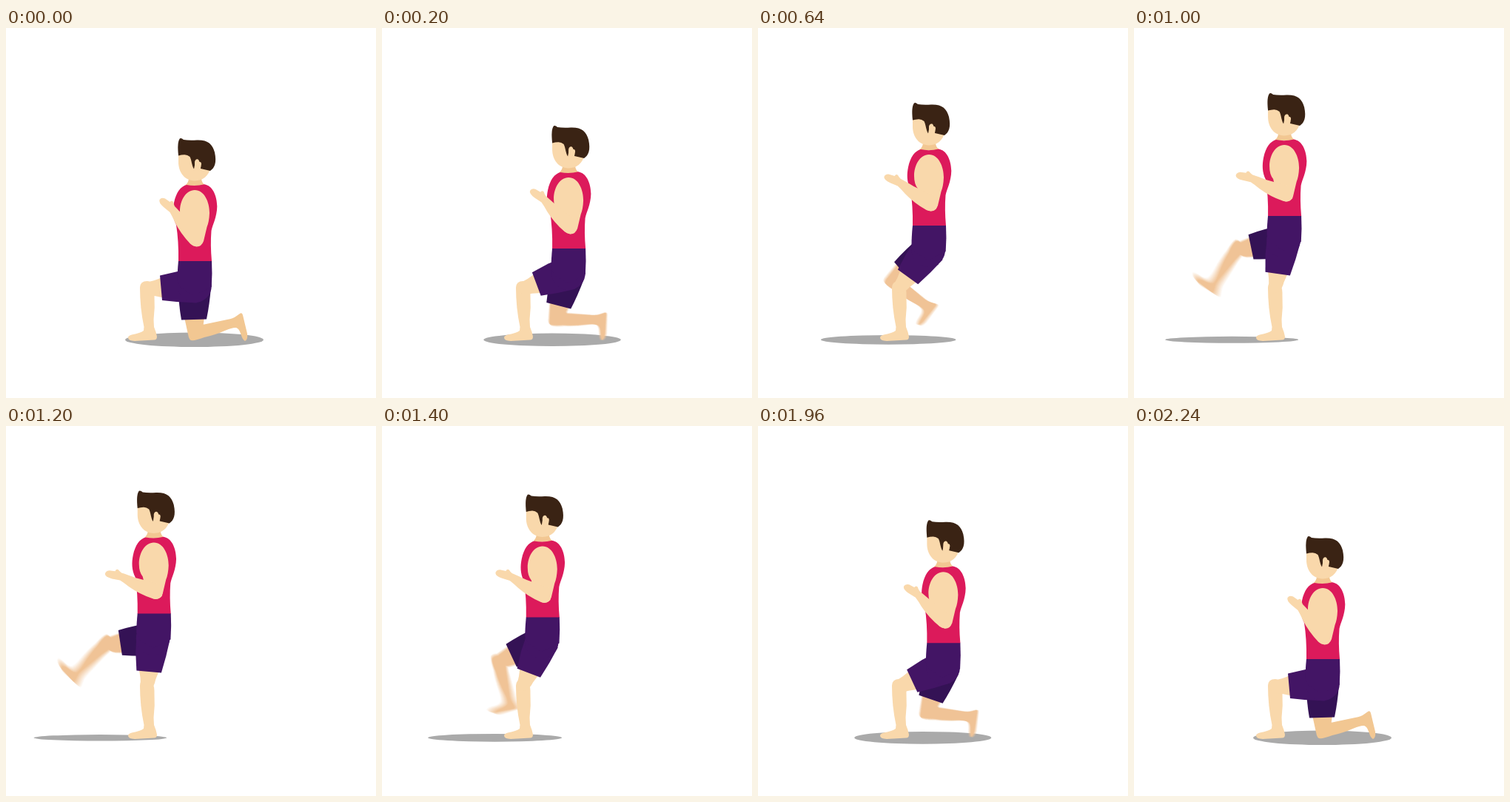
Animation of 500x500 px, one loop 2400 ms. Source, as an HTML page with a canvas:

```html
<!DOCTYPE html>
<html lang="en">
<head>
<meta charset="utf-8">
<title>Lunge exercise</title>
<style>
html, body { margin: 0; width: 100%; height: 100%; overflow: hidden; background: #fff; }
canvas { display: block; }
</style>
</head>
<body>
<canvas id="stage" width="500" height="500"></canvas>
<script>
const LOOP = 2400, STEP = 40, HALF = 1120;
const SKIN = '#f9d8ab', SHADE = '#f2c792', PURPLE = '#431565', DARK = '#341255';
const PINK = '#dc1a5b', HAIR = '#3a2314', GROUND = '#aaaaaa';

const knee = { x: 189.8, y: 351.4 };
const hip = { x: 254.2, y: 349.1 };
const rearKnee = { x: 254, y: 410 };
const elbow = { x: 258, y: 284 };

// All shapes are drawn in the kneeling pose.
const shape = {
  shin: new Path2D('M181 351 Q181 342 191 342 Q201 343 200.5 362 Q201.5 378 199.5 394 L200 404 Q203 411 204 417 Q204 421.500 200 421.500 L174 423 Q165 422.500 165 418.500 Q165 415.500 171 414.300 Q181 412.500 186 409 L186.500 404 Q181 378 181 351Z'),
  thighSkin: new Path2D('M181.500 350 Q183 343.500 190 343 Q199 342.500 212 336.500 L213 364.500 L200.500 362 Q192 362 186 358Z'),
  thigh: new Path2D('M208 334.500 L232 329 L248 327 L262 346 L258 371.500 Q234 371 211 368Z'),
  pelvis: new Path2D('M233 314.500 L278 314.500 Q279 331 277.700 350 L254 362 L236 351 L231.500 341 Q231.500 330 233 314.500Z'),
  rearShorts: new Path2D('M232.500 345 Q233 372 237 394.500 L271 393.500 Q275 374 277 350 L254 340Z'),
  rearThigh: new Path2D('M241 391 L268 391 L266.500 402 Q264 412 255 414 L246 414Z'),
  rearShin: new Path2D('M246 411 Q246 402 256 402 L268 400.500 L299 394 Q307 392.500 311 389.500 L316 386 Q319 384 320 388 L326 413 Q327 421 323 423 Q320 422 317.500 414 Q315 406 311 405 Q306 404.500 297 408.500 Q282 415 268 418 Q255 423 250 422 Q246 420 246 411Z'),
  neck: new Path2D('M247 203 L264 203 Q264 209 270 213 L241 213.500 Q247 209 247 203Z'),
  tank: new Path2D('M244 212 Q256 214.500 268 211.300 C279 213 285 226 285.300 241 C285 256 279 266 277.500 274 Q276 293 278 315 L233 315 Q233.500 288 230 266 C225 256 225 246 227 236 C230 222 236 214 244 212Z'),
  face: new Path2D('M233 168 L262 165 L277 188 Q272 206 255 206.500 C241 206 233 195 233 181Z'),
  hair: new Path2D('M233 172.500 Q231 154 235 149.300 Q237 148.300 240 151 Q247 152.200 258 151.500 C273 151 279 157 282 168 C285 182 282 189 276 193 L263 190 L256 180 L254 190.500 C251 186 251 179 248.500 174 Q245 171 241 171.200 Q237 171.300 233 172.500Z'),
  ear: new Path2D('M255 191 L255 181 Q256 176.500 259.500 177.500 Q261 178.500 261.500 181 Q264 180.500 264 184 Q263.500 188 262.500 191 Q258 194 255 191Z'),
  upperArm: new Path2D('M255 219 C268 219 275 235 275 250 Q274.500 262 271.500 269 L267 288 Q264 296 257 295.500 Q248 294 244 282 L240 265 Q235 259 235 248 C235 233 243 219 255 219Z'),
  forearm: new Path2D('M249 291.500 Q236 278 228 262 Q225 255 221.500 249 L213 242 Q206 236 207.500 232 Q210 228.500 215 230.500 L221.500 235 Q224 232.500 226 235 Q226.500 238 228 241 Q234 247 242 256 L266 278 Q268 288 262 294 Q255 297 249 291.500Z')
};

const ctx = document.getElementById('stage').getContext('2d');
const layer = document.createElement('canvas');
layer.width = layer.height = 500;
const soft = layer.getContext('2d');

function turn(p, deg) {
  return new DOMMatrix().translate(p.x, p.y).rotate(deg).translate(-p.x, -p.y);
}

function fill(path, color) {
  ctx.fillStyle = color;
  ctx.fill(path);
}

function disc(c, x, y, r, color) {
  c.fillStyle = color;
  c.beginPath();
  c.arc(x, y, r, 0, Math.PI * 2);
  c.fill();
}

// u: 0 = kneeling, 1 = standing with the rear knee raised
function pose(u) {
  const front = turn(knee, -86 * u);
  const h = front.transformPoint(hip);
  const body = new DOMMatrix().translate(h.x - hip.x, h.y - hip.y);
  const rear = body.multiply(turn(hip, 89.5 * u));
  const kick = 230 * Math.max(0, u - 0.642);
  return { front, body, rear, rearShin: rear.multiply(turn(rearKnee, kick)) };
}

function rearSkin(u) {
  const p = pose(u), path = new Path2D();
  path.addPath(shape.rearThigh, p.rear);
  path.addPath(shape.rearShin, p.rearShin);
  return path;
}

function drawRearSkin(u, moving) {
  if (!moving) return fill(rearSkin(u), SHADE);
  const n = 15;
  soft.globalCompositeOperation = 'source-over';
  soft.clearRect(0, 0, 500, 500);
  soft.globalCompositeOperation = 'lighter';
  soft.globalAlpha = 1 / n;
  soft.fillStyle = SHADE;
  for (let i = 0; i < n; i++) {
    const v = u + 0.012 * (2 * i / (n - 1) - 1);
    soft.fill(rearSkin(Math.min(1, Math.max(0, v))));
  }
  ctx.drawImage(layer, 0, 0);
}

function draw(u, moving) {
  const p = pose(u);
  ctx.resetTransform();
  ctx.fillStyle = '#fff';
  ctx.fillRect(0, 0, 500, 500);

  ctx.fillStyle = GROUND;
  ctx.beginPath();
  ctx.ellipse(254.5 - 137 * u, 421.3, 93.5 - 4 * u, 9.8 - 6 * u, 0, 0, Math.PI * 2);
  ctx.fill();

  drawRearSkin(u, moving);
  ctx.setTransform(p.rear);
  fill(shape.rearShorts, DARK);

  ctx.resetTransform();
  fill(shape.shin, SKIN);
  ctx.setTransform(p.front);
  fill(shape.thighSkin, SKIN);
  fill(shape.thigh, PURPLE);
  disc(ctx, 255, 348.5, 22.8, PURPLE);

  ctx.setTransform(p.body);
  fill(shape.pelvis, PURPLE);
  fill(shape.neck, SHADE);
  fill(shape.tank, PINK);
  fill(shape.face, SKIN);
  fill(shape.hair, HAIR);
  fill(shape.ear, SKIN);
  fill(shape.upperArm, SKIN);
  ctx.setTransform(p.body.multiply(turn(elbow, -30 * u)));
  fill(shape.forearm, SKIN);
}

function progress(t) {
  if (t <= HALF) return t / HALF;
  const v = Math.max(0, 2 * HALF - t) / HALF;
  return v - 0.13 * v * (1 - v) ** 2;
}

const start = performance.now();
function tick() {
  const t = Math.floor((performance.now() - start) % LOOP / STEP) * STEP;
  const u = progress(t);
  draw(u, u > 0);
  requestAnimationFrame(tick);
}
tick();
</script>
</body>
</html>
```
